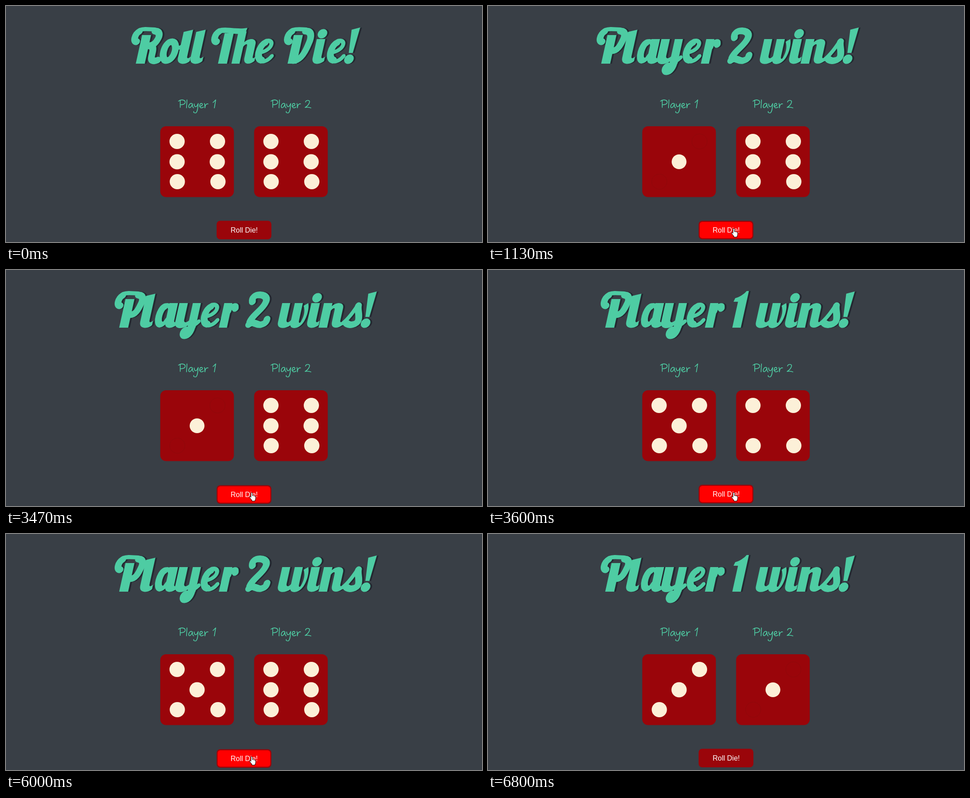
An HTML page that plays this animation: 1060 px wide and 528 px high, repeating every 7.27 s.

```html
<!DOCTYPE html>
<html lang="en">
<head>
<meta charset="utf-8">
<title>Roll The Die!</title>
<style>
  html, body { margin: 0; width: 100%; height: 100%; overflow: hidden; background: #393f46; }
  svg { display: block; }
  #title { fill: #4ecca3; stroke: #4ecca3; filter: drop-shadow(4px 0 0 #232931); }
  #title path { stroke-linecap: round; stroke-linejoin: round; }
  .label { fill: none; stroke: #4ecca3; stroke-width: 1.6; stroke-linecap: round; stroke-linejoin: round; }
  .die rect, #button rect { fill: #9a050a; }
  .die circle { fill: #fcf0d8; }
  .die .ghost { fill: none; stroke: #8f090c; }
  #button text { font: 16px "Liberation Sans", Arial, sans-serif; fill: #fff; text-anchor: middle; }
  #button #glow { fill: #f00; }
  #cursor path { fill: #fff; stroke: #000; stroke-linejoin: round; }
</style>
</head>
<body>
<svg width="1060" height="528" viewBox="0 0 1060 528">
  <g id="title" role="img"></g>
  <g id="labels"></g>
  <g class="die" transform="translate(343.5 269)"></g>
  <g class="die" transform="translate(552.5 269)"></g>
  <g id="button">
    <rect x="469" y="480.5" width="122" height="41.5" rx="8"/>
    <rect id="glow" x="471.4" y="483" width="117.2" height="36.6" rx="6"/>
    <text x="530.5" y="506.5">Roll Die!</text>
  </g>
  <g id="cursor">
    <path id="arrow" d="M0 0V16L4 12.5L6.5 18.5L9 17.5L6.5 11.5H12Z"/>
    <path id="hand" d="M-1.5 1.5C-1.5-.5 1.5-.5 1.5 1.5V7C2.5 6 4.5 6 4.5 7.5C5.5 6.7 7 7 7.1 8.3C8 7.7 9 8.3 9 9.5V13C9 15 8 16 7.5 17V19H.5V17C-1.5 15-3 12.5-4.5 10.5C-5 9-3.5 8.3-2.5 9.5L-1.5 10.5Z"/>
  </g>
</svg>
<script>
const $ = id => document.getElementById(id);

// Script lettering, upright before the slant: advance, filled shape, bold stroke, thin stroke.
const curl = "M0-49C-8-50-8-66 1-72";
const sweep = "M1-75.5C10-79 20-77 34-76.5";
const capStem = "M9 0V-64H29V0Z";
const glyphs = {
  " ": [22],
  P: [53, capStem, curl + "M36-73C47-72 49-63 46-54C42-38 38-29 28-29", sweep],
  R: [56, capStem, curl + "M36-73C47-72 49-63 46-55C43-45 37-40 28-40C46-40 39-22 41-13C42-6 50-5 56-8", sweep],
  T: [42, "M14 0V-68H34V0ZM2-80C20-83 40-76 62-80L60-68C44-63 20-71 2-68Z", curl],
  D: [64, "M14 0V-64H34V0Z", "M7-49C-1-50-1-66 8-72M38-73C52-73 55-60 51-44C47-22 40-7 26-7", "M8-75.5C18-79 26-77 38-76.5"],
  a: [50, "M28-55H47V-16C47-11 51-11 54-16V-6C46 3 28 4 28-13Z", "M19-47C9-42 8-11 17-8", "M20-50C27-52 31-47 33-40M17-5C24-5 28-12 31-19"],
  e: [46, "", "M22-47C9-40 9-11 22-8", "M22-5C33-4 39-10 43-17M23-51C42-55 41-31 19-26"],
  h: [45, "M2 0V-72H20V-48C28-58 46-58 46-44V-16C46-11 49-11 52-16V-6C44 3 28 3 28-13V-40C28-46 23-44 20-38V0Z"],
  i: [28, "M3-55H22V-16C22-11 26-11 30-16V-6C22 3 3 4 3-13ZM2.5-67a10.5 10.5 0 1 1 21 0a10.5 10.5 0 1 1-21 0"],
  l: [28, "M0-71L20-76V-16C20-11 24-11 28-16V-6C22 3 0 4 0-13Z"],
  n: [53, "M3 0V-55H22V-48C30-58 48-58 48-44V-16C48-11 52-11 55-16V-6C46 3 30 3 30-13V-40C30-46 25-44 22-38V0Z"],
  o: [44, "", "M22-49C5-49 5-7 20-7C38-7 39-49 22-49Z", "M34-40C37-35 43-34 47-39"],
  r: [39, "M4 0V-55H22V0Z", "M30-47L31-43", "M19-36C20-48 25-51 30-50"],
  s: [42, "", "M28-49C28-38 35-30 35-18C35-6 18-4 10-10", "M2-10C12-20 22-40 27-52"],
  w: [68, "M6-55H24V-18C24-10 31-11 34-17V-55H52V-16C52-10 55-9 57-14C62-28 60-40 55-49L64-55C70-42 68-16 59-6C52 3 38 3 35-5C24 4 6 3 6-12Z"],
  y: [50, "M0-55H19V-18C19-10 26-11 30-16V-55H48V0H30V-5C18 5 0 3 0-13Z", "M40-4C40 10 35 18 29 18C22 18 21 8 28 5", "M30 4C38-1 46-6 52-14"],
  1: [26, "M4 0V-58H-6L-4-66C4-68 14-75 18-82H23V0Z"],
  2: [44, "", "M5-58C1-68 8-73.5 17-73.5C33-73 38-64 34-54C30-40 12-28 9-13M8-7C18-17 26-4 36-7C44-9 46-13 46-19"],
  "!": [29, "M2-76L20-81L16-24H7ZM0-10a10.5 10.5 0 1 1 21 0a10.5 10.5 0 1 1-21 0"]
};

function drawTitle(text) {
  const widths = [...text].map(c => glyphs[c][0]);
  let x = 530 - widths.reduce((a, b) => a + b) / 2;
  $("title").setAttribute("aria-label", text);
  $("title").innerHTML = [...text].map((c, i) => {
    const [, fill = "", bold = "", thin = ""] = glyphs[c];
    const at = x;
    x += widths[i];
    return `<g transform="translate(${at} 129) skewX(-12.4)"><path d="${fill}" stroke="none"/>` +
      `<path d="${bold}" fill="none" stroke-width="15"/><path d="${thin}" fill="none" stroke-width="9"/></g>`;
  }).join("");
}

// Handwritten player labels
const player = "M4-1V-16M0-15C6-20 16-18 15-12C14-8 8-7 4-7M19-18L18 0" +
  "M31-9C27-13 22-6 23-2C24 2 30-2 31-9C31-5 31-1 34 0" +
  "M35-9C35-3 38-1 41-4L44-10C43 0 43 8 39 11C36 12 33 10 34 8" +
  "M47-4C53-4 55-8 52-10C48-11 46-5 48-2C50 1 53 0 56-2M58-10C59-6 59-3 59 0C59-5 61-10 66-9";
const digits = ["M77-12L83-18L80 0", "M77-13C78-18 87-18 86-13C85-8 80-3 76-1C81-2 86-1 89 0"];
$("labels").innerHTML = digits.map((d, i) =>
  `<path class="label" role="img" aria-label="Player ${i + 1}" transform="translate(${384 + 206 * i} 228)" d="${player + d}"/>`).join("");

// Pips: top left, top right, middle left, middle right, bottom left, bottom right, centre
const pips = [[37.5, 34], [127.5, 34], [37.5, 79.5], [127, 79.5], [38, 124], [128.5, 124], [82, 79.5]];
const faces = { 1: [6], 3: [1, 4, 6], 4: [0, 1, 4, 5], 5: [0, 1, 4, 5, 6], 6: [0, 1, 2, 3, 4, 5] };
const dice = document.querySelectorAll(".die");

function drawDie(die, face) {
  const pip = (i, kind = "") => `<circle class="${kind}" cx="${pips[i][0]}" cy="${pips[i][1]}" r="${face === 1 && !kind ? 16.5 : 17}"/>`;
  die.innerHTML = '<rect width="164" height="158.5" rx="13"/>' +
    (face === 1 ? pip(1, "ghost") + pip(4, "ghost") : "") + faces[face].map(i => pip(i)).join("");
}

// All times below count ticks of 1/15 s.
const rolls = [
  [0, "Roll The Die!", 6, 6],
  [15, "Player 2 wins!", 1, 6],
  [54, "Player 1 wins!", 5, 4],
  [74, "Player 2 wins!", 5, 6],
  [91, "Player 1 wins!", 3, 1]
];
const presses = [[14, 17], [35, 36], [52, 54], [72, 74], [90, 92]];
const route = [[9, 1, 510], [10, 170, 516], [11, 350, 517], [12, 480, 510], [13, 547, 498],
  [98, 500, 512], [99, 435, 516], [100, 360, 520], [101, 288, 524]];
const latest = (list, tick) => list.filter(e => e[0] <= tick).pop();
const show = (id, on) => $(id).setAttribute("visibility", on ? "visible" : "hidden");
let shown;

function frame(now) {
  const tick = Math.floor((now % 7270 + 5) * 15 / 1000);
  const roll = latest(rolls, tick);
  if (roll !== shown) {
    shown = roll;
    drawTitle(roll[1]);
    dice.forEach((die, i) => drawDie(die, roll[2 + i]));
  }
  const spot = tick < 102 && latest(route, tick);
  const hover = !!spot && spot[1] > 469 && spot[1] < 591;
  const pressed = presses.some(([from, to]) => tick >= from && tick < to);
  show("glow", hover);
  show("hand", hover);
  show("arrow", spot && !hover);
  if (spot) $("cursor").setAttribute("transform", `translate(${spot[1]} ${spot[2]})`);
  $("button").setAttribute("transform", `translate(0 ${pressed ? 1 : 0})`);
  requestAnimationFrame(frame);
}
frame(0);
</script>
</body>
</html>
```
